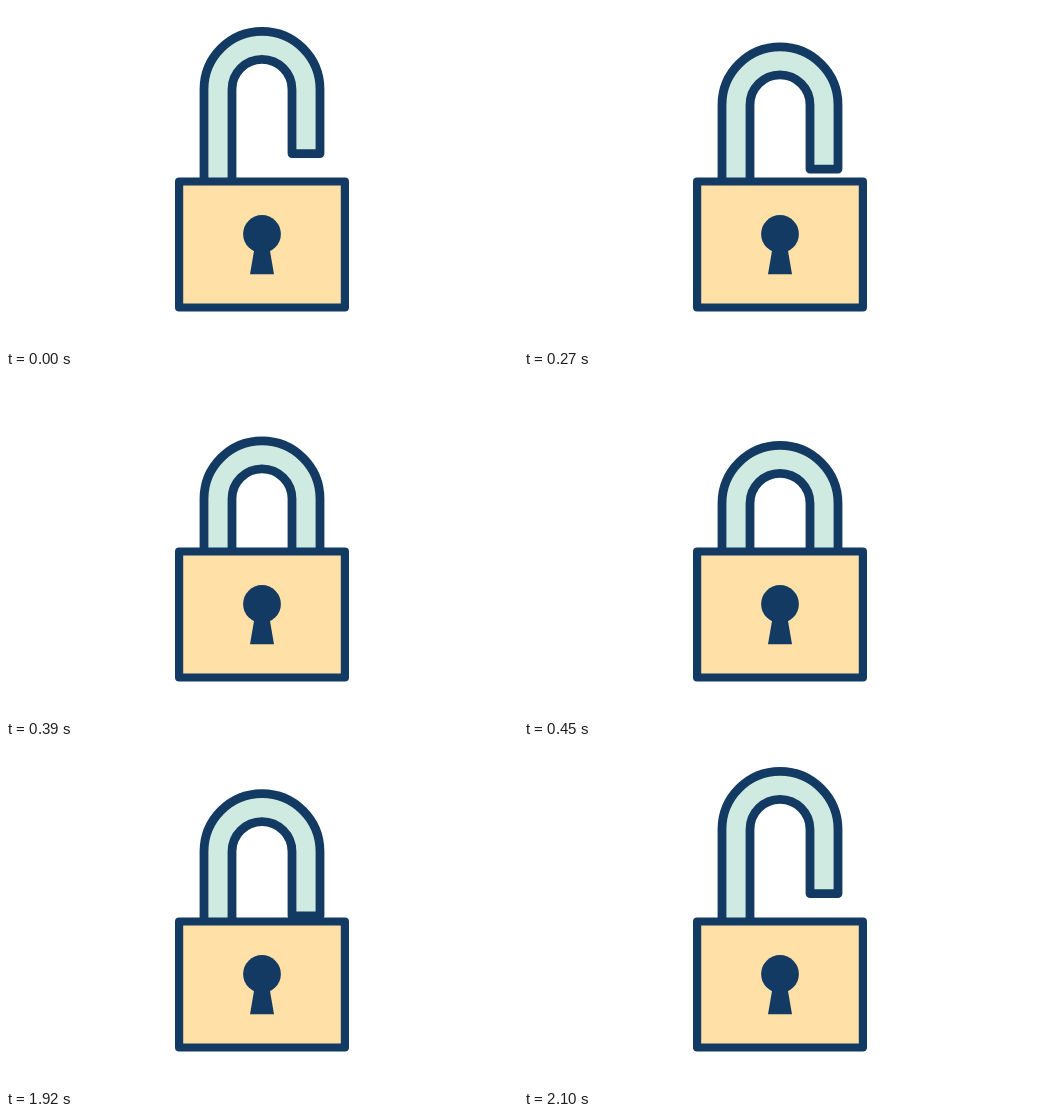
An HTML page for the animation above (2.7 s loop, 512 by 342 pixels).

```html
<!DOCTYPE html>
<html lang="en">
<head>
<meta charset="utf-8">
<title>Padlock</title>
<style>
html, body { margin: 0; width: 100%; height: 100%; overflow: hidden; background: #fff; }
svg { display: block; width: 512px; height: 342px; }
</style>
</head>
<body>
<svg viewBox="0 0 512 342">
  <g stroke="#123a62" stroke-linejoin="round">
    <path id="shackle" fill="#cfeae0" stroke-width="8.8"
      d="M198 225V83.4a58 58 0 0 1 116 0V147.6H286V83.4a30 30 0 0 0 -60 0V225Z"/>
    <rect x="173.1" y="175.5" width="165.8" height="126" fill="#ffe0a6" stroke-width="8.2"/>
  </g>
  <g fill="#123a62">
    <circle cx="256" cy="228" r="18.9"/>
    <path d="M248.5 242h15L268 268.2H244Z"/>
  </g>
</svg>
<script>
const LOOP = 2700, STEP = 30, STEPS = 10, DROP = 44;
const CLOSE_AT = 180, OPEN_AT = 1830;
const shackle = document.getElementById('shackle');

// Progress in 30 ms steps; the first step lands at the start time.
function progress(t, start) {
  const n = Math.floor((t - start) / STEP) + 1;
  return Math.min(STEPS, Math.max(0, n)) / STEPS;
}

const easeInOut = p => p * p * (3 - 2 * p);
const easeOut = p => p + p * p - p * p * p;

function draw(t) {
  const closed = easeInOut(progress(t, CLOSE_AT)) - easeOut(progress(t, OPEN_AT));
  shackle.setAttribute('transform', `translate(0 ${(DROP * closed).toFixed(2)})`);
}

let begin = null;
function tick(now) {
  if (begin === null) begin = now;
  draw((now - begin) % LOOP);
  requestAnimationFrame(tick);
}
draw(0);
requestAnimationFrame(tick);
</script>
</body>
</html>
```
